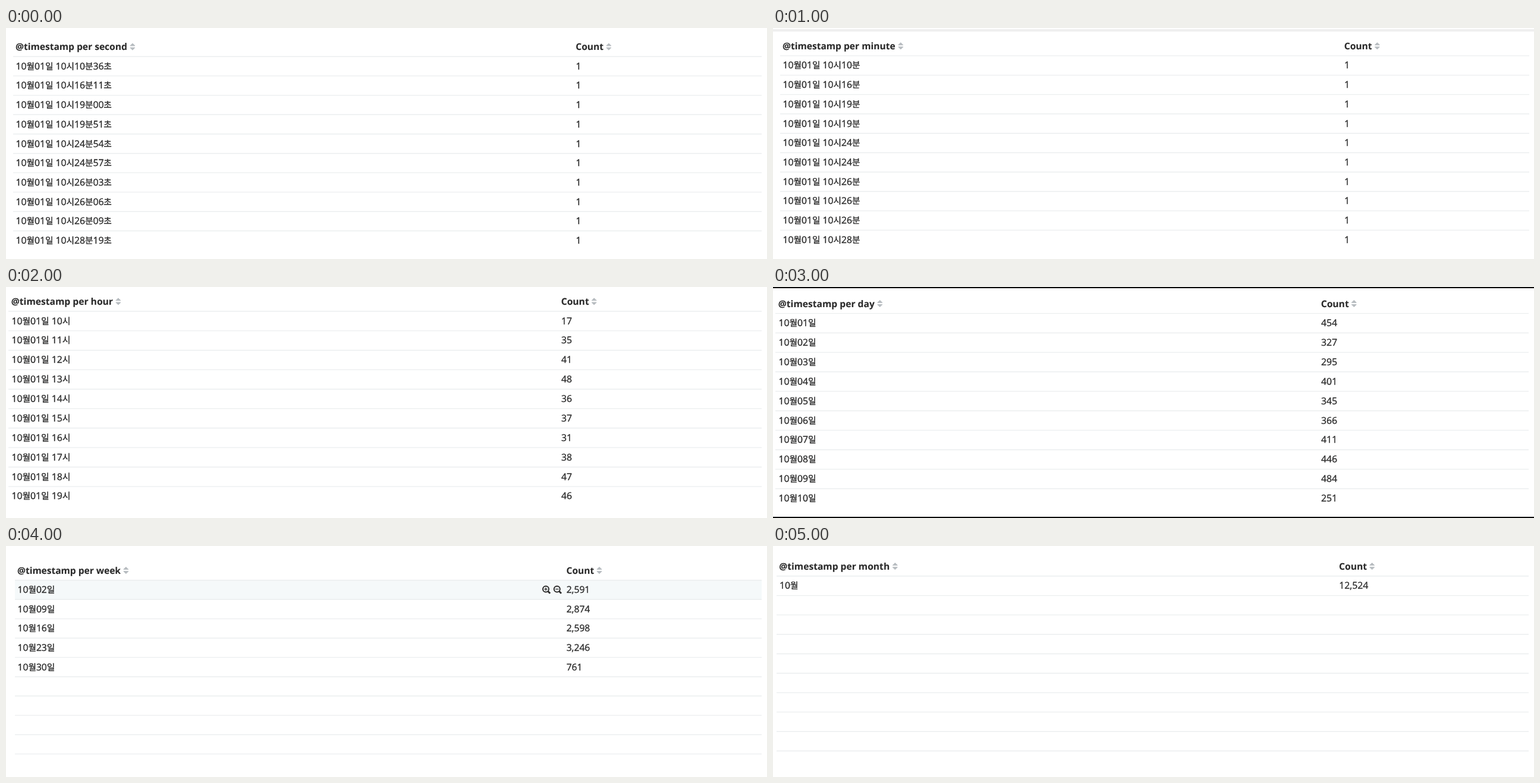
Recreate the animation shown at these times as an HTML page. Size 1280 by 390 pixels, loop 6000 ms.

```html
<!DOCTYPE html>
<html lang="ko">
<head>
<meta charset="utf-8">
<title>@timestamp intervals</title>
<style>
  html, body { margin: 0; width: 100%; height: 100%; overflow: hidden; background: #fff; }
  svg { display: block; width: 1280px; height: 390px; }
  text { font-family: "Open Sans", "Noto Sans CJK KR", "Noto Sans CJK", sans-serif; fill: #2a2a2a; stroke: #2a2a2a; stroke-width: .35; white-space: pre; text-rendering: geometricPrecision; }
  .head { font-weight: 700; font-size: .992em; stroke-width: .1; }
  .ko { font-family: "Noto Sans CJK KR", "Noto Sans CJK", sans-serif; font-size: .935em; }
  .rule { stroke: #ebeeef; stroke-width: 1.4; }
  .sort { fill: #b7bcc0; stroke: #b7bcc0; stroke-width: 1; stroke-linejoin: round; }
  .zoom { fill: none; stroke: #2d2d2d; stroke-width: 2; }
  .view { visibility: hidden; animation: show 6s step-end infinite; }
  @keyframes show {
    0% { visibility: visible; }
    16.66666%, 100% { visibility: hidden; }
  }
</style>
</head>
<body>
<svg id="stage" viewBox="0 0 1280 390"></svg>
<script>
const pad = n => String(n).padStart(2, '0');
const times = '10:36 16:11 19:00 19:51 24:54 24:57 26:03 26:06 26:09 28:19'.split(' ').map(t => t.split(':'));
const hours = [17, 35, 41, 48, 36, 37, 31, 38, 47, 46];
const days = [454, 327, 295, 401, 345, 366, 411, 446, 484, 251];
const weeks = ['2,591', '2,874', '2,598', '3,246', '761'];
const RULES = 10;

const rect = (y, h, fill, x = 0, w = 1280) =>
  `<rect x="${x}" y="${y}" width="${w}" height="${h}" fill="${fill}"/>`;

const zoom = (x, y, sign) =>
  `<g class="zoom" transform="translate(${x} ${y})"><circle r="5"/>` +
  `<path d="M3.6 3.6L7.2 7.2" stroke-width="2.8"/><path d="${sign}" stroke-width="1.3"/></g>`;

// left/right: rule ends; x, count: column origins; arrow: sort mark after the first title
// top: first rule; pitch: row height
const views = [
  { unit: 'second', left: 12, right: 1271, x: 16, count: 958.3, arrow: 208, top: 48.2, pitch: 32.7,
    rows: times.map(([m, s]) => [`10월01일 10시${m}분${s}초`, 1]) },
  { unit: 'minute', left: 12, right: 1272, x: 16, count: 960.8, arrow: 210, top: 46.9, pitch: 32.72,
    rows: times.map(([m]) => [`10월01일 10시${m}분`, 1]), back: rect(2, 4, '#efefef') },
  { unit: 'hour', left: 4, right: 1271, x: 8.8, count: 933.7, arrow: 184, top: 41, pitch: 32.88,
    rows: hours.map((n, i) => [`10월01일 ${10 + i}시`, n]) },
  { unit: 'day', left: 4, right: 1271, x: 8.8, count: 921.7, arrow: 175, top: 44.6, pitch: 32.88,
    rows: days.map((n, i) => [`10월${pad(i + 1)}일`, n]), back: rect(0, 2, '#000') + rect(388, 2, '#000') },
  { unit: 'week', left: 15, right: 1271, x: 19, count: 942.5, arrow: 197, top: 57.7, pitch: 32.6,
    rows: weeks.map((n, i) => [`10월${pad(2 + 7 * i)}일`, n]),
    back: rect(58, 32.5, '#f5f9fa', 15, 1256),
    front: zoom(908, 72.8, 'M-2.7 0H2.7M0 -2.7V2.7') + zoom(926.8, 72.8, 'M-2.7 0H2.7') },
  { unit: 'month', left: 6, right: 1271, x: 10.3, count: 952.1, arrow: 200.5, top: 50.8, pitch: 32.8,
    rows: [['10월', '12,524']] }
];

const label = (x, y, s, cls = '') =>
  `<text x="${x}" y="${y}" class="${cls}">${String(s).replace(/[가-힣]/g, '<tspan class="ko">$&</tspan>')}</text>`;

const sort = (x, y) =>
  `<path class="sort" d="M${x + .8} ${y - 1.6}h8l-4 -4zM${x + .8} ${y + 1.6}h8l-4 4z"/>`;

function draw(v, i) {
  const mid = v.top - 16.6;
  let out = rect(0, 390, '#fff') + (v.back || '');
  for (let k = 0; k < RULES; k++) {
    const y = v.top + k * v.pitch;
    out += `<path class="rule" d="M${v.left} ${y}H${v.right}"/>`;
  }
  out += label(v.x, mid + 5.5, '@timestamp per ' + v.unit, 'head') + sort(v.arrow, mid);
  out += label(v.count, mid + 5.5, 'Count', 'head') + sort(v.count + 50.7, mid);
  v.rows.forEach(([name, n], k) => {
    const y = v.top + k * v.pitch + 21.5;
    out += label(v.x + .6, y, name) + label(v.count + .2, y, n);
  });
  return `<g class="view" font-size="${v.pitch * .48}" style="animation-delay:${i - 6}s">${out}${v.front || ''}</g>`;
}

document.getElementById('stage').innerHTML = views.map(draw).join('');
</script>
</body>
</html>
```
